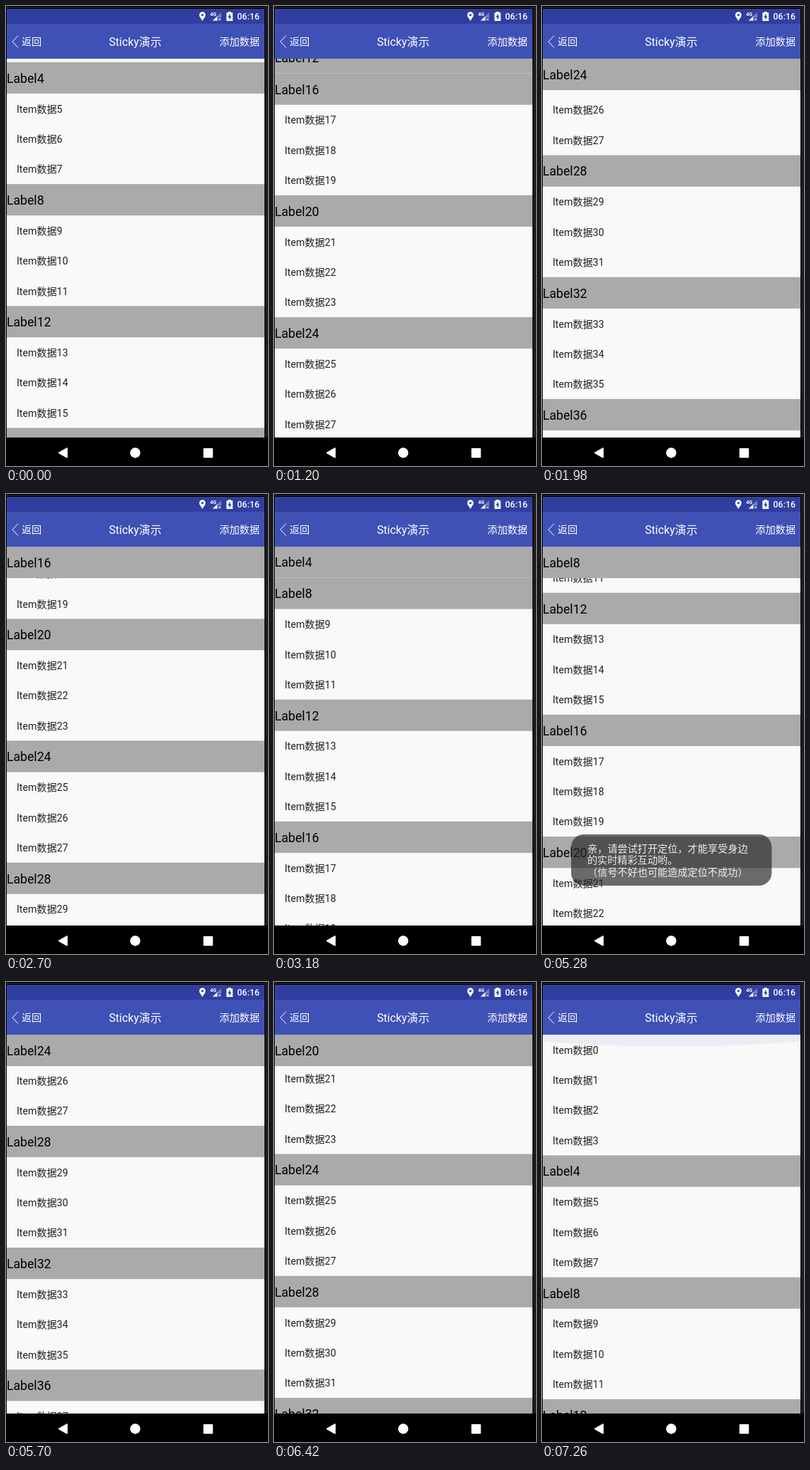
An HTML page with a canvas that plays this animation: 369x646 px, repeating every 8000 ms.

```html
<!DOCTYPE html>
<html lang="zh-CN">
<head>
<meta charset="utf-8">
<style>
  html, body { margin: 0; width: 369px; height: 646px; overflow: hidden; background: #000; }
  canvas { display: block; }
</style>
</head>
<body>
<canvas id="stage" width="369" height="646"></canvas>
<script>
const ctx = document.getElementById('stage').getContext('2d');
const LOOP = 8000, STEP = 60;
const LEFT = 1, WIDTH = 363, TOP = 74, BOTTOM = 606;
const ITEM = 42.36, LABEL = 44.13, GROUP = LABEL + 3 * ITEM;
const FAMILY = 'Roboto, "Noto Sans CJK SC", "Noto Sans CJK", sans-serif';

const fling = u => 1 - (1 - u ** 1.25) ** 3;
const pull = u => u ** 1.838;

// start, end, from, to, ease
const scrolls = [
  [840, 1980, 164.6, 1061.2, fling],
  [2460, 3600, 1061.2, 227.7, fling],
  [5160, 6000, 227.7, 1138.5, fling],
  [6000, 6900, 1138.5, 0, pull]
];

const progress = (t, a, b) => Math.min(1, Math.max(0, (t - a) / (b - a)));

function scrollAt(t) {
  let pos = scrolls[0][2];
  for (const [a, b, from, to, ease] of scrolls) {
    if (t >= a) pos = from + (to - from) * ease(progress(t, a, b));
  }
  return pos;
}

function rect(x, y, w, h, color) {
  ctx.fillStyle = color;
  ctx.fillRect(x, y, w, h);
}

function text(str, x, y, size, color, align = 'left', weight = 400) {
  ctx.font = `${weight} ${size}px ${FAMILY}`;
  ctx.textAlign = align;
  ctx.fillStyle = color;
  ctx.fillText(str, x, y);
}

function poly(points, color) {
  ctx.beginPath();
  points.forEach(([x, y]) => ctx.lineTo(x, y));
  ctx.closePath();
  ctx.fillStyle = color;
  ctx.fill();
}

function disc(x, y, r, color) {
  ctx.beginPath();
  ctx.arc(x, y, r, 0, Math.PI * 2);
  ctx.fillStyle = color;
  ctx.fill();
}

function rowTop(i) {
  if (i < 4) return i * ITEM;
  const j = i % 4;
  return 4 * ITEM + (Math.floor(i / 4) - 1) * GROUP + (j ? LABEL + (j - 1) * ITEM : 0);
}

function label(i, y) {
  rect(LEFT, y, WIDTH, LABEL, '#aaaaaa');
  text('Label' + i, LEFT, y + LABEL / 2 + 6.9, 17.65, '#000');
}

function list(scroll) {
  const yOf = i => TOP + rowTop(i) - scroll;
  let pinned = 0;
  for (let i = 0; i < 60; i++) {
    const y = yOf(i), isLabel = i > 3 && i % 4 === 0;
    if (isLabel && y <= TOP) pinned = i;
    if (y < TOP - LABEL || y > BOTTOM) continue;
    if (isLabel) label(i, y);
    else text('Item数据' + i, 15, y + ITEM / 2 + 5.5, 14.12, '#212121');
  }
  if (pinned) label(pinned, Math.min(TOP, yOf(pinned + 4) - LABEL));
}

// Overscroll glow: a squashed circle segment below the toolbar.
function glow(t) {
  if (t < 6900) return;
  const scale = t < 6960 ? 1.3 : 0.226 + 2.274 * (1 - progress(t, 6960, 7260)) ** 2;
  const r = 545, h = 73;
  ctx.beginPath();
  ctx.ellipse(LEFT + WIDTH / 2, TOP + (h - r) * scale, r, r * scale, 0, 0, Math.PI * 2);
  ctx.fillStyle = `rgba(63,81,181,${Math.min(0.28, 0.3 * scale)})`;
  ctx.fill();
}

function toast(t) {
  const a = progress(t, 4440, 4740) * (1 - progress(t, 5220, 5520));
  if (!a) return;
  ctx.globalAlpha = a;
  ctx.beginPath();
  ctx.roundRect(41, 478, 282.5, 72, 18);
  ctx.fillStyle = 'rgba(40,40,40,.85)';
  ctx.fill();
  ctx.globalAlpha = Math.sqrt(a);
  ['亲，请尝试打开定位，才能享受身边', '的实时精彩互动哟。', '（信号不好也可能造成定位不成功）']
    .forEach((line, i) => text(line, 64, 502.5 + i * 16.6, 14.12, '#fff'));
  ctx.globalAlpha = 1;
}

function statusBar() {
  const dark = '#303f9f';
  rect(LEFT, 4, WIDTH, 21, dark);
  // location pin
  disc(276.6, 12.6, 4.4, '#fff');
  poly([[272.5, 14.2], [280.7, 14.2], [276.6, 21]], '#fff');
  disc(276.6, 12.6, 1.6, dark);
  // mobile signal
  poly([[303, 9], [303, 20.5], [291, 20.5]], 'rgba(255,255,255,.35)');
  poly([[297.5, 14.5], [297.5, 20.5], [291, 20.5]], '#fff');
  text('4G', 287.5, 14, 7, '#fff', 'left', 700);
  rect(298, 16, 5, 5, dark);
  ctx.strokeStyle = '#fff';
  ctx.lineWidth = 1;
  ctx.beginPath();
  ctx.moveTo(299, 17); ctx.lineTo(302.5, 20.5);
  ctx.moveTo(302.5, 17); ctx.lineTo(299, 20.5);
  ctx.stroke();
  // charging battery
  rect(313, 8, 4, 2, '#fff');
  rect(310.5, 9.3, 8.8, 11.7, '#fff');
  poly([[315.6, 10.5], [312.3, 15.8], [314.4, 15.8], [314.4, 19.8], [317.6, 14.4], [315.6, 14.4]], dark);
  text('06:16', 357, 19, 12.4, '#fff', 'right', 500);
}

function toolbar() {
  rect(LEFT, 25, WIDTH, 49, '#3f51b5');
  ctx.strokeStyle = '#fff';
  ctx.lineWidth = 1;
  ctx.beginPath();
  ctx.moveTo(17, 41.5);
  ctx.lineTo(9, 50);
  ctx.lineTo(17, 58.5);
  ctx.stroke();
  text('返回', 22, 55, 14.12, '#fff');
  text('Sticky演示', 182, 56, 15.9, '#fff', 'center');
  text('添加数据', 357, 55, 14.12, '#fff', 'right');
}

function navBar() {
  rect(0, BOTTOM, 369, 40, '#000');
  ctx.lineJoin = 'round';
  ctx.strokeStyle = '#fff';
  ctx.lineWidth = 1.5;
  poly([[74.5, 627.5], [86, 621], [86, 634]], '#fff');
  ctx.stroke();
  disc(182, 627.5, 7.2, '#fff');
  ctx.beginPath();
  ctx.roundRect(278, 621, 13.4, 13.4, 1);
  ctx.fill();
}

function draw(t) {
  rect(0, 0, 369, 646, '#000');
  rect(365, 0, 4, 646, '#1c1c1e');
  rect(0, 1, 365, 2, '#1c1c1e');
  ctx.save();
  ctx.beginPath();
  ctx.rect(LEFT, TOP, WIDTH, BOTTOM - TOP);
  ctx.clip();
  rect(LEFT, TOP, WIDTH, BOTTOM - TOP, '#f9f9f9');
  list(scrollAt(t));
  glow(t);
  toast(t);
  ctx.restore();
  statusBar();
  toolbar();
  navBar();
}

const begin = performance.now();
function tick() {
  const t = (performance.now() - begin) % LOOP;
  draw(Math.floor(t / STEP) * STEP);
  requestAnimationFrame(tick);
}
tick();
</script>
</body>
</html>
```
